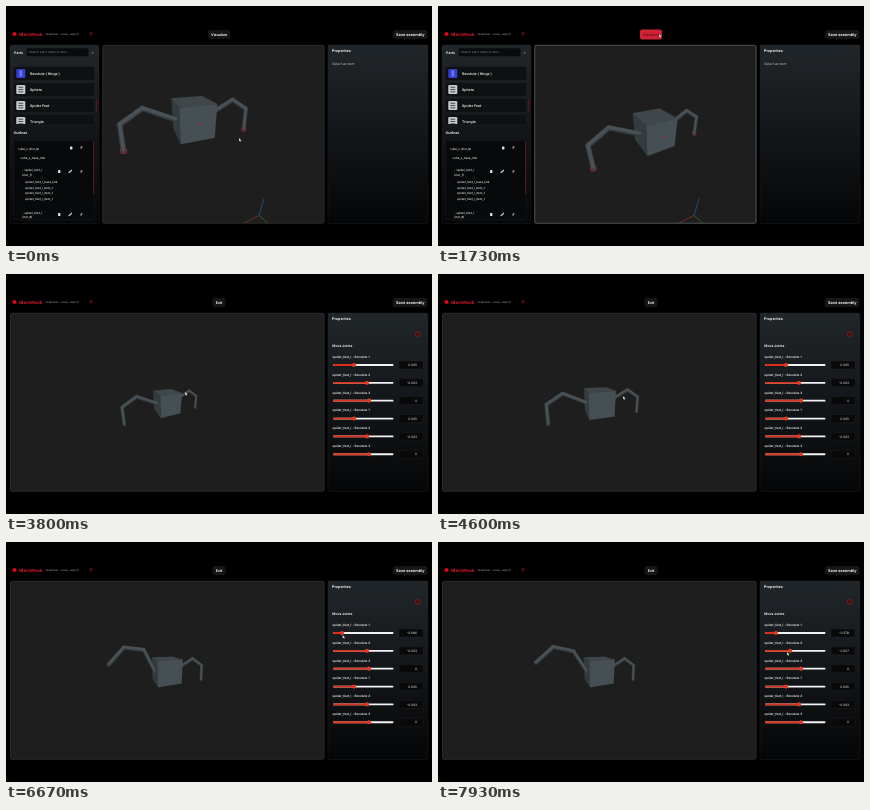
Write an HTML page that moves like this. It is 426 px wide and 240 px high and loops after 8 s.

```html
<!DOCTYPE html>
<html lang="en">
<head>
<meta charset="utf-8">
<title>Robot assembly</title>
<style>
  html, body { margin: 0; width: 100%; height: 100%; overflow: hidden; background: #000; }
  svg { display: block; width: 100vw; height: 100vh; }
  text { font-family: Inter, "Open Sans", sans-serif; fill: #eee; white-space: pre; text-rendering: geometricPrecision; }
</style>
</head>
<body>
<svg id="stage" viewBox="0 0 426 240">
  <defs>
    <linearGradient id="panel" x1="0" y1="0" x2="0" y2="1">
      <stop offset="0" stop-color="#21262a"/>
      <stop offset=".5" stop-color="#131619"/>
      <stop offset="1" stop-color="#050607"/>
    </linearGradient>
    <clipPath id="viewClip"><rect x="5" y="40" width="313" height="177"/></clipPath>
    <clipPath id="listClip"><rect x="4" y="56" width="89" height="62"/></clipPath>
    <clipPath id="treeClip"><rect x="8" y="135" width="80" height="78"/></clipPath>
  </defs>
</svg>
<script>
const LOOP = 8000, SWITCH = 2050;
const stage = document.getElementById('stage');

function set(node, attrs) {
  for (const key in attrs) node.setAttribute(key, attrs[key]);
}
function add(parent, tag, attrs = {}) {
  const node = document.createElementNS('http://www.w3.org/2000/svg', tag);
  set(node, attrs);
  parent.append(node);
  return node;
}
const group = (parent, attrs) => add(parent, 'g', attrs);
const box = (parent, x, y, width, height, fill, rx = 0, more = {}) =>
  add(parent, 'rect', { x, y, width, height, fill, rx, ...more });
function label(parent, x, y, content, size, more = {}) {
  const node = add(parent, 'text', { x, y, 'font-size': size, ...more });
  node.textContent = content;
  return node;
}
const bold = { 'font-weight': 700 };
const semi = { 'font-weight': 600 };
const centered = { 'text-anchor': 'middle' };
const thin = { stroke: '#222427', 'stroke-width': .4 };

// Header
add(stage, 'circle', { cx: 8.5, cy: 28, r: 2.1, fill: '#d80d1c' });
label(stage, 13.3, 29.6, 'MechNook', 4.4, { ...bold, style: 'fill:#dc1a2c' });
label(stage, 39.5, 29, 'assemble • snap • export', 2.75, { style: 'fill:#a2a2a2' });
label(stage, 83.5, 29.7, '?', 4.8, { ...bold, style: 'fill:#c0152a' });
box(stage, 387, 24, 34.5, 9, '#151617', 2);
label(stage, 404.3, 29.6, 'Save assembly', 3.9, { ...bold, ...centered });
const button = box(stage, 202, 24, 22, 9, '#151617', 2);
const buttonText = label(stage, 213, 29.6, '', 3.6, { ...bold, ...centered });

// Viewport
const view = box(stage, 96.7, 39.3, 221.4, 178, '#1e1e1e', 1.5, { 'stroke-width': .7 });
const scene = group(stage, { 'clip-path': 'url(#viewClip)' });

// Parts and outliner
const editor = group(stage);
box(editor, 4, 39, 89, 178.5, 'url(#panel)', 1.5, thin);
label(editor, 8.3, 47.6, 'Parts', 3.4, bold);
box(editor, 20.5, 42, 62, 8.5, '#0a0b0c', 1.5, thin);
label(editor, 23, 47.2, 'Search parts name or desc...', 3, { style: 'fill:#858589' });
label(editor, 85.3, 47.5, '×', 4, { style: 'fill:#aaa' });

const list = group(editor, { 'clip-path': 'url(#listClip)' });
['Revolute ( Hinge )', 'Sphere', 'Spider Feet', 'Triangle'].forEach((name, i) => {
  const y = 67.5 + 16 * i;
  box(list, 7.5, y - 7, 81, 14, '#0e1011', 1.5, thin);
  box(list, 10.3, y - 4.5, 9, 9, i ? '#c9cbcd' : '#343fd0', 1.2);
  if (i) {
    for (const dy of [-2.3, 0, 2.3]) box(list, 12.3, y + dy - .5, 5, 1, '#4a4c4f');
  } else {
    box(list, 13.4, y - 3.3, 2.8, 6.6, '#6673f2', 1);
  }
  label(list, 24, y + 1.2, name, 3.5, semi);
});
box(editor, 90.2, 93, .9, 12, '#68131d', .4);
label(editor, 7.5, 128.3, 'Outliner', 3.5, bold);
box(editor, 7.5, 134.5, 81, 79.5, '#08090a', 1.5, thin);

const tree = group(editor, { 'clip-path': 'url(#treeClip)' });
function treeLines(x, y, step, lines) {
  lines.forEach((line, i) => label(tree, x, y + i * step, line, 2.95, { 'font-weight': 500 }));
}
function treeIcons(y, linked) {
  box(tree, linked ? 52 : 64, y - 1.4, 2.4, 3, '#ddd', .6);
  if (linked) {
    add(tree, 'path', { d: `M63 ${y + 1.2}l2.6 -2.4`, stroke: '#ccc', 'stroke-width': 1.2, 'stroke-linecap': 'round' });
  }
  label(tree, 74.5, y + 1.4, 'F', 3.6, bold);
}
treeLines(12, 143.6, 0, ['cube_s (inst_6)']);
treeLines(14.5, 153.3, 0, ['cube_s_base_link']);
treeLines(16, 164.6, 5, ['- spider_feet_l', '(inst_7)']);
treeLines(19, 177.3, 5.4, ['spider_feet_l_base_link', ...Array(3).fill('spider_feet_l_item_1')]);
treeLines(16, 207.6, 4.8, ['- spider_feet_l', '(inst_8)']);
treeIcons(142, false);
treeIcons(165.5, true);
treeIcons(208.5, true);
box(editor, 87.1, 135.5, .9, 53, '#6d131e', .4);

// Properties
box(stage, 322, 39, 100, 178.5, 'url(#panel)', 1.5, thin);
label(stage, 326, 46.2, 'Properties', 3.7, bold);
const emptyNote = label(stage, 326.3, 58.7, 'Select an item', 3.3, { style: 'fill:#ccc' });
const panel = group(stage);
add(panel, 'circle', { cx: 411.7, cy: 60, r: 2.3, fill: '#2a080c', stroke: '#c9202f', 'stroke-width': .6 });
label(panel, 411.7, 61.2, '×', 3.4, { ...centered, style: 'fill:#e0303f' });
label(panel, 326.3, 73.3, 'Move Joints', 3.4, bold);

const joints = [
  { rest: .005, x: 348, perUnit: 17.4 },
  { rest: -.003, x: 361, perUnit: 44 },
  { rest: 0, x: 363, perUnit: 44 },
];
const sliders = [...joints, ...joints].map((joint, i) => {
  const y = 91 + 17.85 * i;
  label(panel, 326.3, y - 7.2, `spider_feet_l - Revolute ${i % 3 + 1}`, 3.1, semi);
  box(panel, 327, y - .9, 60.5, 1.8, '#f2f2f2', .9);
  const fill = box(panel, 327, y - .9, 0, 1.8, '#d8301c', .9);
  const thumb = add(panel, 'circle', { cy: y, r: 2.1, fill: '#e23a22' });
  box(panel, 393, y - 4, 24, 8, '#09090a', 1.2, thin);
  const value = label(panel, 411, y + 1.2, '', 3.2, { 'text-anchor': 'end' });
  return number => {
    const x = joint.x + (number - joint.rest) * joint.perUnit;
    set(fill, { width: x - 327 });
    set(thumb, { cx: x });
    value.textContent = number ? number.toFixed(3) : '0';
  };
});

// Timing
const ramp = (t, from, to) => Math.min(1, Math.max(0, (t - from) / (to - from)));
const smooth = (t, from, to) => { const p = ramp(t, from, to); return p * p * (3 - 2 * p); };
const lerp = (a, b, p) => a + (b - a) * p;
const blend = (a, b, p) => Object.fromEntries(Object.keys(a).map(key => [key, lerp(a[key], b[key], p)]));

// Camera: screen centre of the cube, half its edge in pixels, angles in degrees
const views = {
  start: { x: 186.5, y: 111.5, size: 17, yaw: 19, pitch: 22 },
  lowered: { x: 216, y: 124, size: 15.4, yaw: 29, pitch: 29 },
  far: { x: 161, y: 128, size: 4, yaw: 50, pitch: 30 },
  near: { x: 160.5, y: 127.7, size: 12.2, yaw: 17, pitch: 17 },
  side: { x: 160, y: 128, size: 11.6, yaw: 20, pitch: 15 },
};
function cameraAt(t) {
  if (t < SWITCH) return blend(views.start, views.lowered, ramp(t, 0, 1730) ** 1.7);
  const zoomed = blend(views.far, views.near, smooth(t, 2950, 4200));
  return blend(zoomed, views.side, smooth(t, 4700, 5200));
}

const RADIAN = Math.PI / 180, DISTANCE = 7.5;
function projector({ x, y, size, yaw, pitch }) {
  const sy = Math.sin(yaw * RADIAN), cy = Math.cos(yaw * RADIAN);
  const sp = Math.sin(pitch * RADIAN), cp = Math.cos(pitch * RADIAN);
  return (px, py, pz) => {
    const depth = pz * cy - px * sy;
    const scale = size * DISTANCE / (DISTANCE - py * sp - depth * cp);
    return { x: x + (px * cy + pz * sy) * scale, y: y - (py * cp - depth * sp) * scale, scale };
  };
}

// Robot: a cube with a three-hinge leg on each side
const segments = [[1.86, 27], [1.36, -59], [1.53, -54]];
const axes = ['#24608c', '#3d7433', '#8c3a2c'].map(stroke => add(scene, 'path', { stroke, 'stroke-width': .7 }));

function makeLeg(side) {
  const foot = add(scene, 'circle', { fill: '#b01d2a' });
  const lines = ['#343b3f', '#485155'].map(stroke => segments.map(() =>
    add(scene, 'line', { stroke, 'stroke-linecap': 'round' })));
  return (project, angles, editing) => {
    let reach = 1, height = 0, heading = 0;
    let from = project(side * reach, height, 0);
    segments.forEach(([length, bend], i) => {
      heading += bend * RADIAN - angles[i];
      reach += length * Math.cos(heading);
      height += length * Math.sin(heading);
      const to = project(side * reach, height, 0);
      const width = (from.scale + to.scale) * .145;
      lines.forEach((shade, layer) => set(shade[i], {
        x1: from.x, y1: from.y, x2: to.x, y2: to.y,
        'stroke-width': layer ? width * .65 : width,
        transform: `translate(0 ${-layer * width * .14})`,
      }));
      from = to;
    });
    set(foot, { cx: from.x, cy: from.y, r: editing ? from.scale * .19 : 0 });
  };
}
const drawRight = makeLeg(1);
const faces = ['#343b3f', '#3f474b', '#465054'].map(fill => add(scene, 'path', { fill, stroke: fill, 'stroke-width': .2 }));
const drawLeft = makeLeg(-1);
const marker = add(scene, 'circle', { r: 1.1, fill: '#b52a35' });

function drawRobot(camera, angles, editing) {
  const project = projector(camera);
  const square = [[-1, -1], [1, -1], [1, 1], [-1, 1]];
  const sides = [(a, b) => [-1, a, b], (a, b) => [a, 1, b], (a, b) => [a, b, 1]];
  faces.forEach((face, i) => {
    const corners = square.map(([a, b]) => project(...sides[i](a, b)));
    set(face, { d: 'M' + corners.map(p => `${p.x} ${p.y}`).join('L') + 'Z' });
  });
  drawLeft(project, angles, editing);
  drawRight(project, [0, 0, 0], editing);
  const center = project(0, 0, 1);
  set(marker, { cx: center.x, cy: center.y, visibility: editing ? 'visible' : 'hidden' });
}

function drawAxes(t, camera, editing) {
  const zoom = smooth(t, 2950, 4200);
  const x = editing ? 253 + 3 * ramp(t, 0, 1730) : camera.x + 10 + 35 * zoom;
  const y = editing ? 209.5 : camera.y + 7 + 130 * zoom;
  const ends = editing ? ['5 -17', '14 12', '-16 8'] : ['0 -13', '15 11', '-14 11'];
  axes.forEach((axis, i) => set(axis, { d: `M${x} ${y}l${ends[i]}` }));
}

// Pointer stops: time, x, y
const stops = [
  [0, 233, 132], [1000, 240, 80], [1650, 221, 28], [2100, 221, 28], [2700, 171, 112], [4600, 185, 122],
  [5100, 200, 126], [5600, 348, 91], [5750, 348, 92], [6500, 336, 93], [6800, 337, 93],
  [7250, 361, 109], [7850, 349, 110],
];
function pointerAt(t) {
  const next = stops.findIndex(stop => stop[0] > t);
  if (next < 0) return stops[stops.length - 1].slice(1);
  const [t0, x0, y0] = stops[next - 1], [t1, x1, y1] = stops[next];
  const p = ramp(t, t0, t1);
  return [lerp(x0, x1, p), lerp(y0, y1, p)];
}
const cursor = add(stage, 'path', {
  d: 'M0 0V3.6L.9 2.8L1.5 4.1L2.1 3.8L1.5 2.6H2.6Z', fill: '#fff', stroke: '#111', 'stroke-width': .25,
});

const show = (node, visible) => set(node, { visibility: visible ? 'visible' : 'hidden' });

function render(t) {
  const editing = t < SWITCH;
  const [mx, my] = pointerAt(t);
  const half = editing ? 11 : 6.5;
  const hover = Math.abs(mx - 213) < half && my > 24 && my < 33;

  show(editor, editing);
  show(emptyNote, editing);
  show(panel, !editing);
  set(view, {
    x: editing ? 96.7 : 4.5, width: editing ? 221.4 : 313.6,
    stroke: editing && t > 250 ? '#6c6e70' : '#343536',
  });
  const grow = hover ? .6 : 0;
  set(button, {
    x: 213 - half, y: 24 - grow, width: half * 2, height: 9 + 2 * grow,
    fill: hover ? '#cf2335' : '#151617',
  });
  buttonText.textContent = editing ? 'Visualize' : 'Exit';
  buttonText.style.fill = hover ? '#7a101c' : '#eee';

  const angles = joints.map(joint => joint.rest);
  angles[0] += -.691 * smooth(t, 5750, 6500) + .108 * smooth(t, 6700, 6880);
  angles[1] += -.204 * smooth(t, 7300, 7850);
  sliders.forEach((move, i) => move(i < 3 ? angles[i] : joints[i - 3].rest));

  const camera = cameraAt(t);
  drawAxes(t, camera, editing);
  drawRobot(camera, angles, editing);
  set(cursor, { transform: `translate(${mx} ${my})` });
}

const start = performance.now();
function tick() {
  render((performance.now() - start) % LOOP);
  requestAnimationFrame(tick);
}
tick();
</script>
</body>
</html>
```
